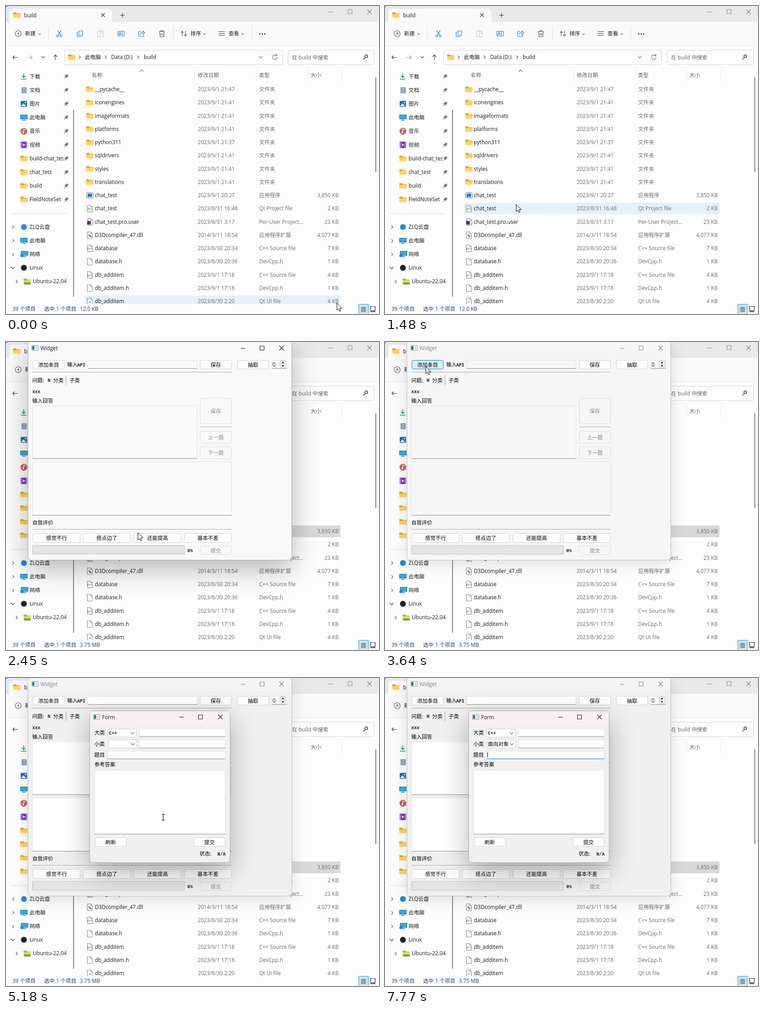
These frames come from a looping animation (823 by 680 pixels, 8 s). An HTML page with a canvas:

```html
<!DOCTYPE html>
<html lang="zh">
<head>
<meta charset="utf-8">
<style>
html, body { margin: 0; width: 100%; height: 100%; overflow: hidden; background: #fdfdfd }
canvas { display: block }
</style>
</head>
<body>
<canvas id="stage" width="823" height="680"></canvas>
<script>
const c = document.getElementById('stage').getContext('2d');
const UI = '11.7px "Open Sans", "Noto Sans CJK SC", "Noto Sans CJK", sans-serif';
const SONG = '11.5px "Noto Sans CJK SC", "Noto Sans CJK", sans-serif';
const MONO = 'bold 10px "Liberation Mono", monospace';
const TINY = 'bold 5.5px "Open Sans", sans-serif';
const INK = '#1b1b1b', GREY = '#6d6d6d', BLUE = '#0078d4', STEEL = '#3f4a56';
const LOOP = 8000;

// ---- drawing helpers (y of a text is its middle) ----
function text(s, x, y, color = INK, font = UI, align = 'left') {
  c.font = font;
  c.fillStyle = color;
  c.textAlign = align;
  c.fillText(s, x, y + (font === MONO ? 3.7 : font === TINY ? 2 : 4.2));
}
function rect(x, y, w, h, color) {
  c.fillStyle = color;
  c.fillRect(x, y, w, h);
}
function box(x, y, w, h, r, fill, edge) {
  c.beginPath();
  c.roundRect(x + .5, y + .5, w - 1, h - 1, r);
  if (fill) { c.fillStyle = fill; c.fill(); }
  if (edge) { c.strokeStyle = edge; c.lineWidth = 1; c.stroke(); }
}
function dot(x, y, r, color) {
  c.fillStyle = color;
  c.beginPath();
  c.arc(x, y, r, 0, 7);
  c.fill();
}
function at(x, y, draw) {
  c.save();
  c.translate(x, y);
  draw();
  c.restore();
}
function line(x, y, d, color = STEEL, width = 1.1) {
  at(x, y, () => {
    c.strokeStyle = color;
    c.lineWidth = width;
    c.stroke(new Path2D(d));
  });
}
function area(x, y, d, color) {
  at(x, y, () => { c.fillStyle = color; c.fill(new Path2D(d)); });
}
const right = (x, y, color = '#555') => line(x, y, 'M-2-3.5 1.5 0-2 3.5', color);
const down = (x, y, s = 3, color = '#666') => line(x, y, `M${-s} ${-s / 2}L0 ${s / 2} ${s} ${-s / 2}`, color);
function caption(xMin, xMax, xClose, y, color) {
  if (xMin) {
    line(xMin, y + .5, 'M-5 0H5', color);
    line(xMax, y, 'M-4.5-4.5H4.5V4.5H-4.5Z', color);
  }
  line(xClose, y, 'M-5-5 5 5M5-5-5 5', color);
}

// ---- file icons ----
function folder(x, y) {
  area(x, y, 'M-8-5Q-8-6-7-6H-2L0-4H7Q8-4 8-3V0H-8Z', '#e5a31d');
  area(x, y, 'M-8-2H-1L1-3H8V5Q8 6 7 6H-7Q-8 6-8 5Z', '#ffd35c');
}
function page(x, y) {
  area(x, y, 'M-5.5-7H2L5.5-3.5V7.5H-5.5Z', '#fdfdfd');
  line(x, y, 'M-5.5-7H2L5.5-3.5V7.5H-5.5ZM2-7V-3.5H5.5', '#7c7c7c', 1);
}
function screen(x, y) {
  rect(x - 8, y - 6, 16, 10, '#1267a5');
  rect(x - 7, y - 5, 14, 8, '#27b2e4');
  rect(x - 4, y + 5.5, 8, 1.5, '#33708f');
}
function appIcon(x, y) {
  box(x - 7.5, y - 6, 15, 12, 1, '#f7f7f7', '#8b969c');
  rect(x - 6, y - 4, 5, 8, '#24838a');
  rect(x + 1, y - 4, 4, 8, '#d8dfe2');
}
const icons = {
  dir: folder,
  exe(x, y) {
    box(x - 8, y - 6, 16, 12, 1, '#fff', '#4a6785');
    rect(x - 5, y - 3.5, 10, 7, '#1976c9');
  },
  pro(x, y) { page(x, y); text('Pro', x, y + 1, '#3fa34d', TINY, 'center'); },
  user(x, y) { page(x + 1, y); rect(x - 6, y - 2, 8, 8, '#68217a'); },
  dll(x, y) {
    page(x, y);
    dot(x - 1, y, 2.2, '#8797a5');
    dot(x + 1.5, y + 3, 2, '#66788a');
  },
  cpp(x, y) { page(x, y); text('C++', x, y + 1, '#2b3fae', TINY, 'center'); },
  h: page,
  ui(x, y) { page(x, y); text('ui', x, y + 1, '#777', TINY, 'center'); }
};

const DIR = '文件夹', SRC = 'C++ Source file';
const files = [
  ['dir', '__pycache__', '2023/9/1 21:47', DIR],
  ['dir', 'iconengines', '2023/9/1 21:41', DIR],
  ['dir', 'imageformats', '2023/9/1 21:41', DIR],
  ['dir', 'platforms', '2023/9/1 21:41', DIR],
  ['dir', 'python311', '2023/9/1 21:37', DIR],
  ['dir', 'sqldrivers', '2023/9/1 21:41', DIR],
  ['dir', 'styles', '2023/9/1 21:41', DIR],
  ['dir', 'translations', '2023/9/1 21:41', DIR],
  ['exe', 'chat_test', '2023/9/1 20:27', '应用程序', '3,850 KB'],
  ['pro', 'chat_test', '2023/8/31 16:48', 'Qt Project file', '2 KB'],
  ['user', 'chat_test.pro.user', '2023/8/31 3:17', 'Per-User Project...', '23 KB'],
  ['dll', 'D3Dcompiler_47.dll', '2014/3/11 18:54', '应用程序扩展', '4,077 KB'],
  ['cpp', 'database', '2023/8/30 20:34', SRC, '7 KB'],
  ['h', 'database.h', '2023/8/30 20:36', 'DevCpp.h', '1 KB'],
  ['cpp', 'db_additem', '2023/9/1 17:18', SRC, '4 KB'],
  ['h', 'db_additem.h', '2023/9/1 17:18', 'DevCpp.h', '1 KB'],
  ['ui', 'db_additem', '2023/8/30 2:20', 'Qt UI file', '4 KB']
];
const ROW = 29.25, EXE = 8;

// ---- file manager ----
function tabsAndTools() {
  rect(0, 0, 823, 35, '#e8e9e9');
  area(0, 0, 'M0 0H5Q0 0 0 5Z', '#456');
  rect(0, 35, 823, 52, '#fafafa');
  rect(0, 87, 823, 1, '#e4e4e4');
  box(7, 6, 228, 40, 8, '#fafafa');
  folder(24, 20);
  text('build', 40, 21);
  line(214, 20, 'M-4-4 4 4M4-4-4 4', '#333');
  line(257, 20.5, 'M-5 0H5M0-5V5', '#333');
  caption(716, 759, 802, 12.5, '#858585');

  line(27, 61, 'M-6.5 0A6.5 6.5 0 1 1 6.5 0A6.5 6.5 0 1 1-6.5 0M-3 0H3M0-3V3', '#41536b');
  text('新建', 42, 61);
  down(74, 62, 2.5);
  for (const x of [93, 369, 542]) rect(x, 46, 1, 31, '#e0e0e0');
  line(118, 61, 'M-4-7 3 3M4-7-3 3', STEEL);
  line(118, 61, 'M-6 5A2.2 2.2 0 1 1-1.6 5A2.2 2.2 0 1 1-6 5M1.6 5A2.2 2.2 0 1 1 6 5A2.2 2.2 0 1 1 1.6 5', BLUE);
  line(163, 61, 'M-2-6H6V4H-2ZM-4-3.5H-6V6.5H3', '#1d6fb8');
  line(208, 61, 'M-2-5H-6V7H-1M3-5H6V-2M-2-7H3V-4H-2ZM0-1H7V7H0Z', '#a9c6dc');
  line(254, 61, 'M1-5H-7V5H1M4-5H7V5H4M2.5-7V7M-5 3-2.5-3 0 3M-4 1H-1', '#1d6fb8');
  line(299, 61, 'M-1-5H-6V6H5V3M-3 2Q-2-3 3-3V-6L7-2 3 2V-1', '#1d6fb8');
  line(344, 61, 'M-6.5-4.5H6.5M-2-4.5V-7H2V-4.5M-5-4.5-4 7H4L5-4.5M-1.5-1V4M1.5-1V4', STEEL);
  line(392, 61, 'M-3 6V-5M-6-2-3-5 0-2M4-6V5M1 2 4 5 7 2', '#34536f');
  text('排序', 407, 61);
  down(438, 62, 2.5);
  line(476, 61, 'M-7-4.5H7M-7-.5H7M-7 3.5H7', '#333');
  text('查看', 491, 61);
  down(522, 62, 2.5);
  for (const x of [560, 565.5, 571]) dot(x, 62, 1.4, INK);
}

function addressBar() {
  line(20, 113.5, 'M6 0H-5M-1-4-5 0-1 4', '#333');
  line(53, 113.5, 'M-6 0H5M1-4 5 0 1 4', '#999');
  down(82, 113, 3.5, '#444');
  line(109, 113, 'M0 6V-5M-4-1 0-5 4-1', '#333');
  box(129, 97, 482, 33, 1, '#fdfdfd', '#d3d3d3');
  folder(145, 113);
  right(163, 113);
  text('此电脑', 174, 113);
  right(220, 113);
  text('Data (D:)', 232, 113);
  right(292, 113);
  text('build', 304, 113);
  down(562, 113, 4);
  line(593, 113, 'M4-3.5A5.3 5.3 0 1 0 5.3 0M4.5-6.5V-3H1', '#666');
  box(622, 97, 191, 33, 1, '#fdfdfd', '#d3d3d3');
  text('在 build 中搜索', 631, 114, '#666');
  line(793, 113, 'M-1 1-5 5M-1-2A3 3 0 1 1 5-2A3 3 0 1 1-1-2', '#333', 1.4);
}

function sidebar() {
  const places = ['下载', '文档', '图片', '此电脑', '音乐', '视频', 'build-chat_test', 'chat_test', 'build', 'FieldNoteSet'];
  places.forEach((name, i) => {
    const y = 155.3 + 30.2 * i;
    if (i > 5) folder(39.5, y);
    c.save();
    c.beginPath();
    c.rect(0, 140, 126.5, 310);
    c.clip();
    text(name, 52, y);
    c.restore();
    at(132, y + 1, () => {
      c.rotate(.75);
      area(0, 0, 'M-2.5-6H2.5V-1L4 1H-4L-2.5-1Z', '#70777e');
      rect(-.5, 1, 1, 5, '#70777e');
    });
  });
  line(39, 155, 'M0-6V3M-4-1 0 3 4-1M-6 6.5H6', '#0d9b7a', 1.7);
  box(34, 179, 12, 14, 1, '#6f8fb5');
  line(40, 186, 'M-3.5-3.5H3.5M-3.5 0H3.5M-3.5 3.5H3.5', '#fff');
  box(32, 209, 15, 14, 1, '#1673c8');
  area(39.5, 216, 'M-6 5-1-1 5 5Z', '#fff');
  dot(43, 213, 1.5, '#fff');
  screen(39.5, 246);
  dot(39.5, 276.5, 7.5, '#c9605c');
  line(40, 276, 'M-1 3V-4L3-3', '#fff', 1.4);
  dot(38, 279, 1.8, '#fff');
  box(32, 299, 15, 15, 1, '#6a32c9');
  line(39.5, 306.5, 'M-5-6V6M5-6V6', '#c7abf5', 1.6);
  area(39.5, 306.5, 'M-2-3 3 0-2 3Z', '#fff');

  rect(10, 457.5, 123, 1, '#d5d5d5');
  ['ZLQ云盘', '此电脑', '网络', 'Linux'].forEach((name, i) => {
    const y = 487.5 + 30.2 * i;
    text(name, 52, y);
    if (i < 3) right(16, y + .5);
    else down(15, y, 4, INK);
  });
  dot(39.5, 488, 6.5, '#168fea');
  screen(39.5, 518);
  screen(41, 547);
  dot(35, 551, 3.5, '#2d84bd');
  dot(39.5, 578, 6.5, '#222');
  right(24, 608.5);
  folder(47, 608);
  rect(40, 610, 14, 5, '#35c25a');
  text('Ubuntu-22.04', 59, 608);
  rect(148, 229, 2, 413, '#858585');
}

function fileList(hover, picked, active) {
  line(299, 143, 'M-4 2 0-2 4 2', '#666');
  [['名称', 189], ['修改日期', 423], ['类型', 558], ['大小', 672]]
    .forEach(([s, x]) => text(s, x, 153, '#53606d'));
  for (const x of [416, 552, 665, 741]) rect(x, 140, 1, 26, '#e5e5e5');
  c.save();
  c.beginPath();
  c.rect(150, 166, 660, 492);
  c.clip();
  files.forEach(([kind, name, date, type, size], i) => {
    const y = 184 + ROW * i;
    const back = picked && i === EXE ? (active ? '#cce8ff' : '#d9d9d9') : i === hover ? '#e4f1fc' : '';
    if (back) rect(174, Math.round(y - 13), 564, 26, back);
    icons[kind](185, y);
    text(name, 196, y);
    text(date, 423, y, GREY);
    text(type, 558.5, y, GREY);
    if (size) text(size, 734, y, GREY, UI, 'right');
  });
  c.restore();
  rect(815, 157, 2, 210, '#858585');
}

function statusBar(size) {
  const ink = '#1f3f66';
  text('39 个项目', 14, 669, ink);
  text('选中 1 个项目', 84, 669, ink);
  text(size, 163, 669, ink);
  box(778, 658, 22, 23, 0, '#cbe8f8', '#2a93c4');
  line(789, 669.5, 'M-5.5-4H5.5M-5.5-1H5.5M-5.5 2H5.5M-5.5 5H5.5', INK);
  line(809.5, 668.5, 'M-5-5H5V4H-5Z', INK, 1.2);
  rect(804, 674, 11, 1.5, INK);
}

// ---- form widgets ----
const LOOK = {
  plain: ['#fdfdfd', '#d0d0d0', '#000'],
  hot: ['#e0eef9', BLUE, '#000'],
  down: ['#cce4f7', '#005a9e', '#000'],
  focus: ['#fdfdfd', BLUE, '#000']
};
function button(s, x, y, w, h, look = 'plain', font = SONG) {
  const [fill, edge, ink] = look === 'off' ? [null, '#dcdcdc', '#858585'] : LOOK[look];
  box(x, y, w, h, 3, fill, edge);
  text(s, x + w / 2, y + h / 2 + .3, ink, font, 'center');
}
function field(x, y, w, h, fill = '#fff', edge = '#8a8a8a') {
  box(x, y, w, h, 2, fill, '#e2e2e2');
  rect(x, y + h - 1, w, 1, edge);
}
function combo(x, y) {
  box(x, y, 64, 19, 2, '#fdfdfd', '#cfcfcf');
  down(x + 55, y + 10, 4);
}
const song = (s, x, y) => text(s, x, y, '#000', SONG);
const mono = (s, x, y) => text(s, x, y, INK, MONO);

function frame(x, y, w, h, fill, active) {
  c.save();
  c.shadowColor = active ? 'rgba(0,0,0,.29)' : 'rgba(0,0,0,.13)';
  c.shadowBlur = active ? 60 : 36;
  c.shadowOffsetY = active ? 20 : 8;
  box(x, y, w, h, 8, fill);
  c.restore();
  box(x, y, w, h, 8, fill, active ? '#a5a5a5' : '#bcbcbc');
}
function titleBar(x, y, w, h, color) {
  c.beginPath();
  c.roundRect(x + 1, y + 1, w - 2, h, [7, 7, 0, 0]);
  c.fillStyle = color;
  c.fill();
}

function mainWindow(active, hot, formOpen) {
  const back = active ? '#f9f9f9' : formOpen ? '#f0f0f0' : '#f6f6f6';
  const paper = active ? '#fafafa' : formOpen ? '#fff' : '#f7f7f7';
  const ink = active ? INK : '#858585';
  frame(48, -3, 583, 485, back, active);
  titleBar(48, -3, 583, 31, active ? '#f9f8f8' : formOpen ? '#f3f3f3' : '#f6f6f6');
  appIcon(64, 13);
  text('Widget', 76, 14, ink);
  caption(523, 565, 608, 13.5, ink);

  button('添加条目', 59, 40, 70, 20, hot);
  song('输入', 135, 50);
  mono('API', 157, 50);
  field(180, 40, 242, 19, paper);
  button('保存', 428, 40, 70, 20);
  button('抽取', 510, 40, 70, 20);
  field(586, 40, 34, 19, paper);
  text('0', 588, 49.5);
  box(604, 41, 14, 16, 2, '#f0f0f0', '#bbb');
  area(611, 49, 'M-3-2 0-5.5 3-2ZM-3 2 0 5.5 3 2Z', INK);
  for (const y of [66, 413]) rect(58, y, 440, 1, '#a5a5a5');
  song('问题:', 58, 84.5);
  mono('N', 92, 84.5);
  song('分类', 104, 84.5);
  rect(132, 74, 1, 21, '#999');
  song('子类', 140, 84.5);
  mono('xxx', 58, 109);
  song('输入回答', 58, 129.5);
  field(58, 140, 364, 118, paper);
  button('保存', 428, 124, 70, 57, 'off');
  rect(428, 187, 70, 1, '#a5a5a5');
  button('上一题', 428, 196, 70, 28, 'off');
  button('下一题', 428, 231, 70, 27, 'off');
  field(58, 264, 440, 119, paper);
  song('自我评价', 58, 398.5);
  ['感觉不行', '搭点边了', '还能提高', '基本不差'].forEach((s, i) =>
    button(s, 59 + Math.round(111.3 * i), 422, 105, 21));
  box(58, 449, 336, 20, 0, '#e4e4e4', '#bcbcbc');
  mono('0%', 400, 460);
  button('提交', 428, 450, 70, 20, 'off');
}

function formWindow(active, filled, refresh, focused, caret) {
  const ink = active ? INK : '#858585';
  frame(184, 72, 311, 336, '#f0f0f0', true);
  titleBar(184, 72, 311, 29, active ? '#f8eff1' : '#f3f3f3');
  appIcon(200, 86);
  text('Form', 212, 86.5, ink);
  caption(387, 429, 473, 86, ink);

  song('大类', 195, 121);
  combo(224, 112);
  mono('C++', 227, 121);
  field(294, 111, 190, 19);
  song('小类', 195, 146);
  combo(225, 136);
  if (filled) song('面向对象', 227, 146);
  field(294, 136, 190, 19);
  song('题目', 195, 170);
  field(224, 161, 260, 18, '#fff', focused ? BLUE : undefined);
  if (caret) rect(226, 164, 1, 11, '#000');
  song('参考答案', 195, 190.5);
  field(195, 203, 289, 142);
  button('刷新', 196, 352, 70, 20, refresh);
  button('提交', 414, 352, 70, 20);
  song('状态:', 427, 388);
  mono('N/A', 466.5, 388);
}

function notice(look) {
  frame(230, 186, 211, 105, '#fff', true);
  titleBar(230, 186, 211, 23, '#f9eef0');
  appIcon(240, 198);
  text('提示', 253, 198);
  caption(0, 0, 426, 198, INK);
  text('注意 添加成功后会[重置]答题界面', 260, 229, '#000', UI.replace('11.7', '11.5'));
  c.beginPath();
  c.roundRect(231, 248, 209, 42, [0, 0, 7, 7]);
  c.fillStyle = '#f0f0f0';
  c.fill();
  button('OK', 360, 258, 70, 22, look, UI);
}

// ---- timing: bursts of screen updates [start, end, steps] ----
const bursts = [
  [0, 0, 1], [500, 740, 3], [1110, 1840, 7], [1960, 2080, 2], [2320, 3040, 7], [3160, 3880, 7],
  [4000, 4690, 7], [4810, 5530, 7], [5650, 6370, 7], [6490, 7280, 8], [7770, 7770, 1]
];
function snap(t) {
  const [start, end, n] = bursts.findLast(b => b[0] <= t);
  if (n < 2) return start;
  const step = (end - start) / (n - 1);
  return start + step * Math.min(n - 1, Math.floor((t - start) / step + .05));
}

// pointer path [time, x, y]
const path = [
  [0, 730, 656], [380, 730, 656], [740, 722, 628], [990, 722, 628], [1480, 285, 436],
  [1600, 289, 423], [2450, 291, 421], [3160, 94, 60], [3280, 90, 54], [3640, 90, 54],
  [3880, 141, 90], [4345, 374, 246], [4570, 392, 264], [4930, 392, 264], [5530, 279, 373],
  [5770, 240, 363], [6010, 240, 363], [6370, 252, 312], [6830, 238, 170], [8000, 238, 170]
];
function pointer(t) {
  const i = path.findIndex(p => p[0] > t);
  const [t0, x0, y0] = path[i - 1], [t1, x1, y1] = path[i];
  const k = (t - t0) / (t1 - t0);
  return [x0 + (x1 - x0) * k, y0 + (y1 - y0) * k];
}
function drawPointer(x, y, beam) {
  if (beam) {
    line(x, y, 'M-3-6.5H-1L0-6 1-6.5H3M0-6V6M-3 6.5H-1L0 6 1 6.5H3', '#000', 1.2);
    return;
  }
  const arrow = 'M0 0V16L3.7 12.6 6.2 18 8.6 17 6.2 11.6H11.3Z';
  area(x, y, arrow, '#fff');
  line(x, y, arrow, '#000', 1);
}

function draw(now) {
  const t = snap(now % LOOP);
  const [x, y] = pointer(t);
  const picked = t >= 1700, opened = t >= 1950, formOpen = t >= 3750;
  const noticeOpen = t >= 3870 && t < 4920;

  rect(0, 0, 823, 680, '#fdfdfd');
  tabsAndTools();
  addressBar();
  sidebar();
  fileList(opened ? -1 : Math.floor((y - 169.4) / ROW), picked, !opened);
  statusBar(picked ? '3.75 MB' : '12.0 KB');

  if (opened) {
    c.save();
    if (t < 2070) {
      c.globalAlpha = .6;
      c.translate(339, 240);
      c.scale(.96, .96);
      c.translate(-339, -240);
    }
    mainWindow(t < 3510, t > 3100 && !formOpen ? 'hot' : 'plain', formOpen);
    c.restore();
  }
  if (formOpen) {
    const focused = t >= 6820;
    const refresh = t < 5700 || focused ? 'plain' : t > 5880 && t < 5950 ? 'down' : 'hot';
    formWindow(!noticeOpen, t >= 6000, refresh, focused, focused && t < 7270 || t >= 7770);
  }
  if (noticeOpen) notice(t > 4800 ? 'down' : t > 4460 ? 'hot' : 'focus');

  const inText = formOpen && !noticeOpen && x > 196 && x < 484 && (y > 203 && y < 345 || y > 161 && y < 179);
  if (t < 7150) drawPointer(x, y, inText);
}

function tick(now) {
  draw(now);
  requestAnimationFrame(tick);
}
requestAnimationFrame(tick);
</script>
</body>
</html>
```
